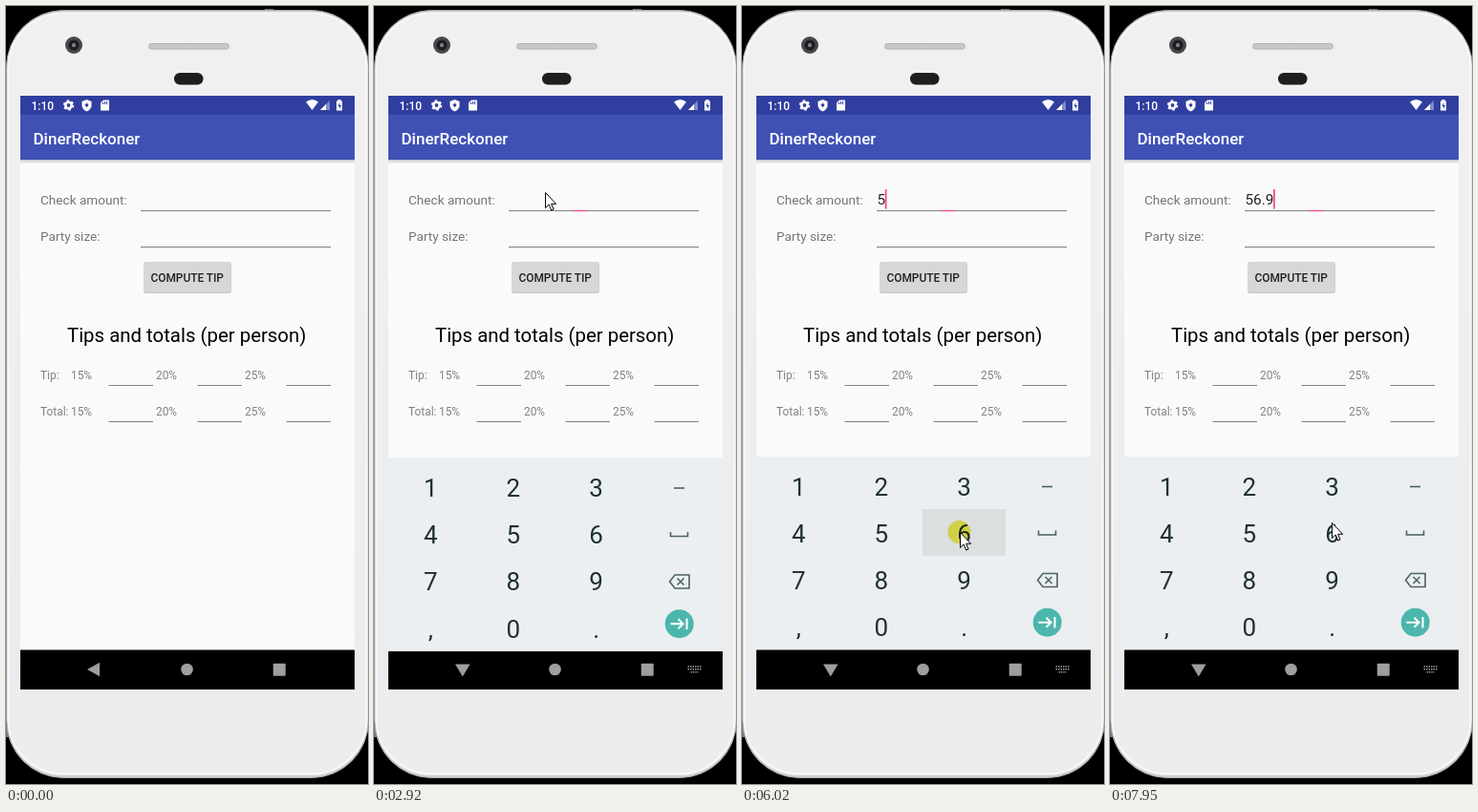
An HTML page for the animation above (8000 ms loop, 379x815 px).

```html
<!DOCTYPE html>
<html lang="en">
<head>
<meta charset="utf-8">
<style>
html, body { margin: 0; width: 100%; height: 100%; overflow: hidden; background: #000; }
svg { display: block; width: 100%; height: 100%; }
text { font-family: Roboto, sans-serif; }
.label { font-size: 13.6px; fill: #757575; }
.small { font-size: 11.9px; fill: #808080; }
.entry { font-size: 15.3px; fill: #212121; }
.key { font-size: 26px; fill: #1c3038; text-anchor: middle; }
.line { stroke: #808080; stroke-width: 1; }
.icon { fill: none; stroke: #4c6168; stroke-width: 1.6; }
</style>
</head>
<body>
<svg viewBox="0 0 379 815">
  <defs>
    <linearGradient id="shell" x2="0" y2="1">
      <stop offset="0" stop-color="#f0f0f1"/>
      <stop offset="1" stop-color="#ebecee"/>
    </linearGradient>
    <linearGradient id="shade" x2="0" y2="1">
      <stop offset="0" stop-color="#000" stop-opacity=".22"/>
      <stop offset="1" stop-color="#000" stop-opacity="0"/>
    </linearGradient>
  </defs>

  <!-- phone -->
  <g fill="#77757a">
    <rect x="271" y="3" width="9" height="4"/>
    <rect y="75" width="3" height="9"/>
    <rect y="754" width="3" height="12"/>
  </g>
  <rect x=".5" y="4.5" width="379" height="804" rx="60" fill="#d9d2d5" stroke="#a9a2a6"/>
  <rect x="2.5" y="7.5" width="375" height="797" rx="57" fill="url(#shell)" stroke="#f8f8f8" stroke-width="2"/>
  <circle cx="71" cy="41" r="9" fill="#47484b"/>
  <circle cx="71" cy="41" r="5.5" fill="#1b1c20"/>
  <circle cx="71" cy="41" r="2.2" fill="#777b82"/>
  <rect x="149.5" y="39.5" width="84" height="5.5" rx="2.7" fill="#c9c7c9" stroke="#b3aeb1"/>
  <rect x="176" y="70" width="30.5" height="12.5" rx="6.2" fill="#1d1e20"/>

  <!-- bars -->
  <rect x="15" y="94" width="350" height="622" fill="#fafafa"/>
  <rect x="15" y="161" width="350" height="4" fill="url(#shade)"/>
  <rect x="15" y="94" width="350" height="20" fill="#303f9f"/>
  <rect x="15" y="114" width="350" height="47" fill="#3f51b5"/>
  <g fill="#fff">
    <text x="26.5" y="108.5" font-size="12" font-weight="500">1:10</text>
    <circle cx="65.5" cy="104" r="3.2" fill="none" stroke="#fff" stroke-width="2.6"/>
    <circle cx="65.5" cy="104" r="4.8" fill="none" stroke="#fff" stroke-width="1.8" stroke-dasharray="2.5 2.53"/>
    <path d="M84.5 98l5 2v4q0 4-5 6.500q-5-2.500-5-6.500v-4z"/>
    <path d="M84.500 101.500l2 2-2 3-2-3z" fill="#303f9f"/>
    <path d="M102 98.500h6v11h-9v-8z"/>
    <path d="M101.500 101v2m2-3v3m2-3v3" stroke="#303f9f"/>
    <path d="M314 100.500q6.500-5 13 0l-6.500 8.500z"/>
    <path d="M329 109l10-10v10z" fill-opacity=".4"/>
    <path d="M329 109l6-6v6z"/>
    <path d="M346 99.500h1.500v-1.500h3v1.500h1.500v10h-6z"/>
    <path d="M349.500 101l-2 4h1.500v3l2-4h-1.500z" fill="#303f9f"/>
    <text x="28.500" y="145" font-size="17" font-weight="500">DinerReckoner</text>
  </g>

  <!-- form -->
  <text class="label" x="36" y="207.500">Check amount:</text>
  <text class="label" x="36" y="246">Party size:</text>
  <rect x="144" y="269" width="92" height="32" rx="2" fill="#000" opacity=".2"/>
  <rect x="144" y="268" width="91.500" height="31.500" rx="1.700" fill="#d6d7d7"/>
  <text x="189.700" y="288.500" font-size="11.900" font-weight="500" fill="#212121" text-anchor="middle">COMPUTE TIP</text>
  <text x="64" y="352" font-size="20.400" fill="#000">Tips and totals (per person)</text>
  <g id="form"></g>
  <path id="ripple" d="M209 214.500h13" stroke="#ff4081" stroke-width="1.300"/>
  <text id="entry" class="entry" x="141.500" y="208"></text>
  <rect id="caret" y="192" width="1.700" height="20.500" fill="#ff4081"/>

  <!-- keyboard -->
  <g id="keyboard">
    <rect x="15" y="472" width="350" height="204" fill="#eceff1"/>
    <rect id="pressed" width="87" height="49" fill="#dbdfe0"/>
    <g id="keys"></g>
    <path class="icon" d="M314 503.500h11" stroke="#1c3038" stroke-width="2"/>
    <path class="icon" d="M310.500 549.500v4.500h18v-4.500"/>
    <path class="icon" d="M315 594.500h15v14h-15l-5.500-7zM317.500 598l7 7m0-7l-7 7"/>
    <circle cx="319.700" cy="645.700" r="15" fill="#4db6ac"/>
    <path d="M310.500 645.700h13m-5-5l5 5-5 5M327.500 640v11.500" fill="none" stroke="#fff" stroke-width="2"/>
  </g>

  <!-- navigation -->
  <rect id="nav" x="15" width="350" fill="#000"/>
  <g fill="#9e9e9e">
    <path id="back"/>
    <circle cx="189.500" cy="695" r="6.300"/>
    <rect x="279.700" y="688.700" width="13" height="13" rx="1"/>
    <path id="ime" d="M328.500 692h14m-14 2.700h14m-11 3h8" stroke="#9e9e9e" stroke-width="1.400" stroke-dasharray="1.500 1"/>
  </g>

  <circle id="press" r="12" fill="#f3ee55" style="mix-blend-mode: multiply"/>
  <path id="cursor" d="M.5.5v16l3.700-3.500 2.500 6 2.400-1-2.500-5.700h5z" fill="#fff" stroke="#000"/>
</svg>
<script>
const LOOP = 8000, STEP = 77.9;
const el = id => document.getElementById(id);

// Underlines and percentage labels
let form = '';
const line = (x, y, w) => form += `<path class="line" d="M${x} ${y}h${w}"/>`;
const small = (x, y, s) => form += `<text class="small" x="${x}" y="${y}">${s}</text>`;
line(141, 214.5, 199);
line(141, 252.5, 199);
[['Tip:', 391], ['Total:', 429]].forEach(([name, y]) => {
  small(36, y, name);
  ['15%', '20%', '25%'].forEach((rate, i) => {
    small([68, 157, 250][i], y, rate);
    line(107.5 + 93 * i, y + 6.5, 46.5);
  });
});
el('form').innerHTML = form;

el('keys').innerHTML = [...'123456789,0.'].map((c, i) =>
  `<text class="key" x="${59.2 + i % 3 * 86.7}" y="${512.5 + Math.floor(i / 3) * 49.2}">${c}</text>`).join('');

// [time, x, y] of the pointer tip
const path = [
  [22, 290, 830], [880, 213, 195], [1900, 213, 195], [2290, 179, 195],
  [3530, 179, 195], [3900, 191, 370], [4160, 178, 530], [4480, 163, 561],
  [5010, 163, 561], [5400, 215, 561], [5560, 215, 561], [5710, 228, 551],
  [6170, 228, 551], [6640, 240, 647], [6720, 240, 650], [7100, 240, 650],
  [7180, 235, 629], [7340, 232, 601], [7720, 232, 601], [7950, 232, 541]
];
const fieldTaps = [[1110, 1300], [2370, 2540]];
// [down, up, character, column, row]
const keyTaps = [
  [4710, 4860, '5', 1, 1], [5860, 6090, '6', 2, 1],
  [6950, 7110, '.', 2, 3], [7400, 7630, '9', 2, 2]
];
const caretOn = [
  [430, 960], [1430, 1980], [2540, 2920], [3460, 3950],
  [4480, 5400], [5860, 6600], [7100, 8000]
];

const active = (spans, t) => spans.find(([a, b]) => t >= a && t < b);
const show = (id, on) => el(id).setAttribute('visibility', on ? 'visible' : 'hidden');
const set = (id, attrs) => { for (const k in attrs) el(id).setAttribute(k, attrs[k]); };

function pointer(t) {
  const s = (Math.floor(t / STEP) + .2) * STEP;
  const i = path.findIndex(p => p[0] > s);
  if (i === 0) return path[0].slice(1);
  if (i < 0) return path.at(-1).slice(1);
  const [t0, x0, y0] = path[i - 1], [t1, x1, y1] = path[i];
  const p = (s - t0) / (t1 - t0);
  return [Math.round(x0 + (x1 - x0) * p), Math.round(y0 + (y1 - y0) * p)];
}

function draw(t) {
  const [x, y] = pointer(t);
  set('cursor', { transform: `translate(${x} ${y})` });
  set('press', { cx: x - .5, cy: y });
  const tap = active(keyTaps, t);
  show('press', tap || active(fieldTaps, t));
  show('pressed', tap);
  if (tap) set('pressed', { x: 102.5 + (tap[3] - 1) * 86.5, y: 478 + tap[4] * 49 });

  el('entry').textContent = keyTaps.filter(k => t >= k[1]).map(k => k[2]).join('');
  set('caret', { x: 141.2 + el('entry').getComputedTextLength() });
  show('caret', active(caretOn, t));
  show('ripple', t >= 1110);

  const imeOpen = t >= 1430;
  const shift = t >= 2920 && t < 3040 ? 1.5 : 0;
  el('keyboard').style.display = t >= 2920 ? '' : 'none';
  set('keyboard', { transform: `translate(0 ${shift})` });
  set('nav', { y: 674.5 + shift, height: 41.5 - shift });
  set('back', { d: imeOpen ? 'M85 689.500h15.500l-7.700 13z' : 'M85 695l13-7.200v14.400z' });
  show('ime', imeOpen);
}

function tick() {
  draw(performance.now() % LOOP);
  requestAnimationFrame(tick);
}
tick();
</script>
</body>
</html>
```
